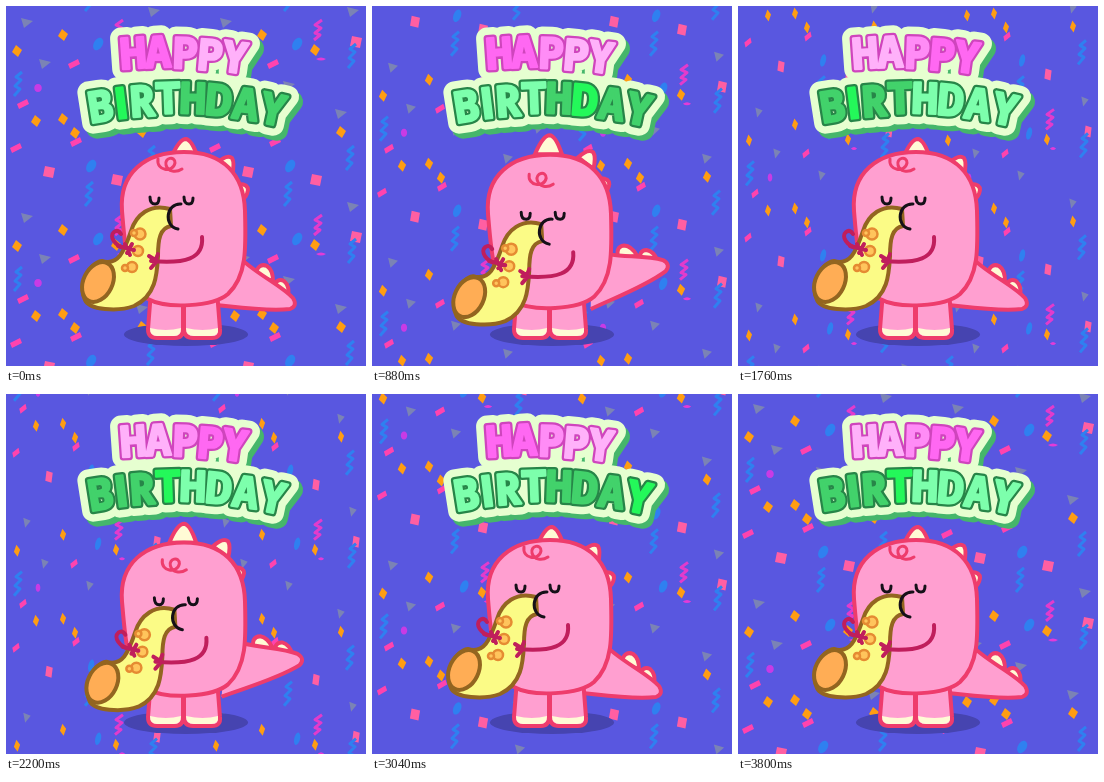
Animation, 360 px wide and 360 px high, one loop 3.84 s. Source, as an HTML page:

```html
<!DOCTYPE html>
<html lang="en">
<head>
<meta charset="utf-8">
<title>Happy Birthday</title>
<style>
html, body { margin: 0; width: 100%; height: 100%; overflow: hidden; background: #5957e0; }
svg { display: block; width: 360px; height: 360px; }
text { font: 700 43px "Noto Sans Mono", "DejaVu Sans Mono", monospace; text-anchor: middle; stroke-linejoin: round; }
text.plain { font-family: Roboto, Inter, sans-serif; }
.skin { fill: #ff9fd0; stroke: #ee3c6c; stroke-width: 4; }
.horn { fill: #fffbd5; stroke: #ee3c6c; stroke-width: 4; }
.line { fill: none; stroke-linecap: round; stroke-linejoin: round; }
.brass { stroke: #936520; stroke-width: 4; stroke-linejoin: round; }
</style>
</head>
<body>
<svg viewBox="0 0 360 360">
  <defs><g id="tile"></g></defs>
  <g id="confetti"></g>
  <g id="title"></g>
  <ellipse cx="180" cy="328.5" rx="62" ry="11.5" fill="#4644b0"/>
  <g id="tail">
    <path class="horn" d="M249 270Q252 256 261 260Q267 264 267 275ZM267 282Q271 271 278 275Q284 280 282 290Z"/>
    <path class="skin" d="M230 248C246 266 274 278 287 292Q292 300 284 303C258 306 225 300 200 298"/>
  </g>
  <g id="legs">
    <path class="skin" d="M145 285L142 323Q142 332 151 332H169Q177 332 177 323V285ZM178 285V323Q178 332 187 332H206Q215 332 214 323L211 285Z"/>
    <path fill="#fffbd5" d="M144 322Q160 326 175 322Q175 330 168 330H151Q144 330 144 322ZM180 322Q197 326 212 322Q213 330 205 330H188Q180 330 180 322Z"/>
  </g>
  <path id="crest" class="horn" d="M165 152Q173 133 180 133Q186 134 192 152Z"/>
  <path id="spikes" class="horn" d="M211 157Q221 148 226 152Q229 157 226 169ZM233 178Q242 178 242 184Q241 191 235 195Z"/>
  <path id="body" class="skin" d="M116 205C113 167 139 146 178 146C217 146 238 168 239 205C240 242 241 270 222 288C207 301 160 303 142 293C121 280 119 240 116 205Z"/>
  <g id="player">
    <path class="line" stroke="#ee3c6c" stroke-width="3" d="M152 153C150 165 167 167 169 157C169 149 158 152 160 159C162 166 170 167 176 163"/>
    <path class="line" stroke="#c01e5c" stroke-width="4" d="M121 243C108 240 103 230 108 226Q112 223 115 228"/>
    <path class="brass" fill="#fbfb86" d="M164 203C144 197 130 209 125 225C118 246 112 260 96 255C82 257 73 282 79 294C83 304 112 306 128 300C150 290 151 268 152 250C152 233 154 222 165 220Z"/>
    <ellipse class="brass" cx="92" cy="276" rx="14.5" ry="21" transform="rotate(26 92 276)" fill="#ffad55"/>
    <g fill="#ffc45c" stroke="#e58b32" stroke-width="2.5">
      <circle cx="134" cy="228" r="5.5"/><circle cx="128" cy="227" r="3"/>
      <circle cx="132" cy="245" r="5"/><circle cx="126" cy="261" r="5"/><circle cx="119" cy="262" r="3"/>
    </g>
    <path class="line" stroke="#c01e5c" stroke-width="4" d="M112 240L128 244M119 238L124 249M126 238L121 247M196 231C198 253 179 258 145 255M143 250L151 255L145 262M152 248L148 258"/>
    <path class="line" stroke="#151018" stroke-width="3" d="M144 191Q144 198 149 198Q153 198 153 192M178 191Q178 198 183 198Q187 198 187 192M175 198C160 197 157 220 172 223"/>
  </g>
</svg>
<script>
const LOOP = 3840, TILE_W = 199, TILE_H = 195;
const $ = id => document.getElementById(id);

function add(parent, tag, attrs, text = '') {
  const el = document.createElementNS('http://www.w3.org/2000/svg', tag);
  for (const key in attrs) el.setAttribute(key, attrs[key]);
  el.textContent = text;
  parent.append(el);
  return el;
}

// Confetti kinds: colour, path, and x, y places inside one tile.
const kinds = [
  ['#7b83b5', 'M-6 -5L6 -2L-3 5Z', [21, 17, 39, 58, 84, 80, 136, 108, 148, 6, 167, 78]],
  ['#ff9d12', 'M-1 -6L5 -1L1 6L-5 1Z', [110, 44, 11, 45, 57, 29, 57, 113, 69, 127, 30, 115, 136, 126]],
  ['#ff5fa2', 'M-4 -6L6 -4L4 6L-6 4Z', [43, 166, 111, 174, 151, 36]],
  ['#ff43ae', 'M-6 0L4 -5L6 0L-4 5Z', [70, 136, 10, 142, 68, 58, 17, 98]],
  ['#2f80f0', 'M4 -12L-2 -7L3 -4L-3 2L2 5L-4 12', [12, 78, 83, 188, 147, 50, 145, 152]],
  ['#e23bcc', 'M4 -10L-3 -5L3 -2L-3 3L2 5L-4 10', [113, 24]],
  ['#2f80f0', 'M3 -6C9 -3 2 8 -3 6C-8 3 -2 -8 3 -6Z', [92, 38, 85, 160]],
  ['#c83be5', 'M0 -4C5 -4 5 4 0 4C-5 4 -5 -4 0 -4Z', [32, 82]],
  ['#e33bd8', 'M-5 0Q0 -3 5 0Q0 3 -5 0Z', [116, 53]]
];
const pieces = [];
for (const [color, d, places] of kinds) {
  const ribbon = !d.endsWith('Z');
  for (let i = 0; i < places.length; i += 2) {
    const el = add($('tile'), 'path', {
      d, fill: ribbon ? 'none' : color, stroke: ribbon ? color : 'none', 'stroke-width': 3, 'stroke-linejoin': 'round'
    });
    pieces.push({ el, x: places[i], y: places[i + 1], ribbon });
  }
}
for (let col = -1; col < 2; col++)
  for (let row = -2; row < 3; row++)
    add($('confetti'), 'use', { href: '#tile', x: col * TILE_W, y: row * TILE_H });

// Title letters: x, centre y, rotation.
const words = [
  { text: 'HAPPY', ink: '#cf45bd', places: [[127, 47, -4], [152, 46, -2], [179, 47, 2], [204, 49, 5], [229, 51, 8]] },
  { text: 'BIRTHDAY', ink: '#278548', places: [[94, 100, -9], [115, 97, -7], [136, 95, -4], [162, 92, -2],
    [187, 92, 2], [213, 94, 5], [240, 98, 8], [267, 103, 12]] }
];
function drawWords(fill, stroke, width, dx = 0, dy = 0) {
  return words.map(({ text, ink, places }) => places.map(([x, y, turn], i) =>
    add($('title'), 'text', {
      class: text[i] === 'I' ? 'plain' : '',
      transform: `translate(${x + dx} ${y + dy}) rotate(${turn})`, y: 15.4,
      fill: fill || ink, stroke: stroke || ink, 'stroke-width': width
    }, text[i])));
}
drawWords('#45b66b', '#45b66b', 22, 4, 5);
drawWords('#e6ffd0', '#e6ffd0', 22);
drawWords('', '', 7);
const [happy, birthday] = drawWords('#fff', '#fff', 2.5);

function paint(el, color) {
  el.setAttribute('fill', color);
  el.setAttribute('stroke', color);
}

function colorTitle(t) {
  const leftLit = Math.cos((t - 420) / 2640 * 2 * Math.PI) > 0;
  const spark = Math.floor(1 + t / 210) % 8;
  happy.forEach((el, i) => paint(el, i === 2 ? '#ff8cf6' : (i < 2) === leftLit ? '#ff68f2' : '#ffb1fa'));
  birthday.forEach((el, i) => paint(el, i === spark ? '#24f85a' : (i < 4) === leftLit ? '#7dffac' : '#42d26b'));
}

function dropConfetti(t) {
  $('confetti').setAttribute('transform', `translate(0 ${t / LOOP * TILE_H})`);
  const flip = 0.8 + 0.2 * Math.cos(t / LOOP * 2 * Math.PI);
  for (const { el, x, y, ribbon } of pieces)
    el.setAttribute('transform', `translate(${x} ${y}) scale(${ribbon ? 1 : flip} 1)`);
}

// Alternate left and right dips, each followed by a short rest.
function poseDino(t) {
  const beat = t % 640, right = t % 1280 >= 640;
  const dip = beat < 480 ? Math.sin(Math.PI * (beat / 480) ** 0.8) ** 2 : 0;
  const [dx, dy, lift] = right ? [5.5, 16, 32] : [-4, 8.5, 16];
  const set = (id, x, y, extra = '') => $(id).setAttribute('transform', `translate(${x * dip} ${y * dip}) ${extra}`);
  set('player', dx, dy);
  set('tail', 8, 0, `rotate(${-lift * dip} 215 280)`);
  set('crest', dx * -0.4, -4);
  set('spikes', right ? -5 : -2, -6);
  set('body', 0, 3);
}

function frame(now) {
  const t = Math.floor(now % LOOP / 40) * 40;
  dropConfetti(t);
  colorTitle(t);
  poseDino(t);
  requestAnimationFrame(frame);
}
frame(0);
</script>
</body>
</html>
```
